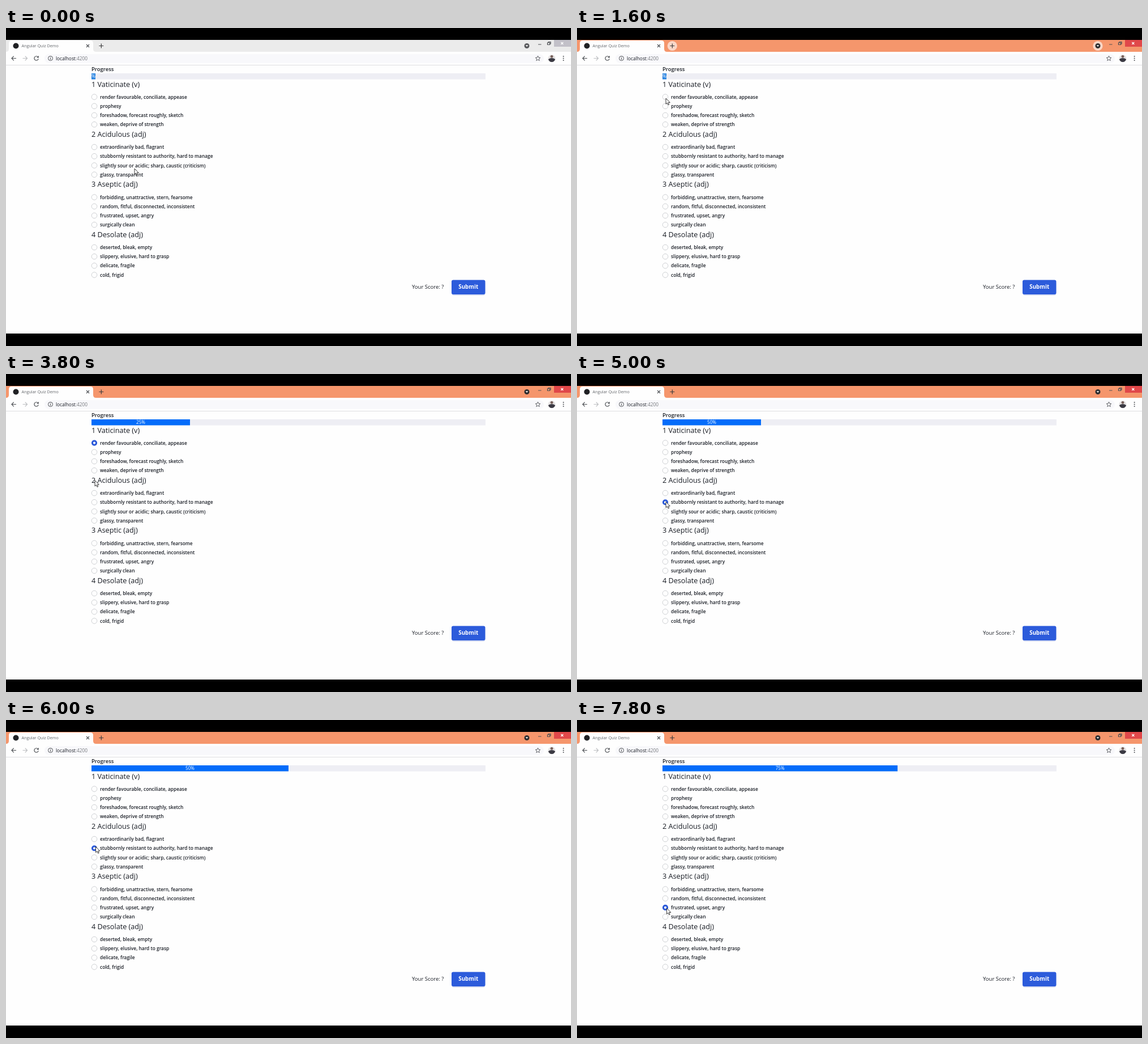
An HTML page for the animation above (8 s loop, 998 by 561 pixels).

```html
<!DOCTYPE html>
<html lang="en">
<head>
<meta charset="utf-8">
<title>Quiz</title>
<style>
  html, body { margin: 0; width: 100%; height: 100%; overflow: hidden; background: #000; }
  svg { display: block; width: 998px; height: 561px; font-family: "Open Sans", "Noto Sans", sans-serif; fill: #181c24; }
  .line { fill: none; stroke: #4d5054; stroke-width: 1.2; }
  .head { font-size: 12.65px; font-weight: 500; }
  .opt { font-size: 8.35px; font-weight: 600; }
  .radio circle { fill: #fff; stroke: #c2c4c8; stroke-width: .8; }
  .radio.on circle { stroke: #2b59d9; stroke-width: 3; r: 3.6px; }
  #bar { fill: #58595c; }
  .title { fill: #ebebeb; }
  .close { fill: #c2c0c8; }
  .active { fill: #2e2e30 !important; }
  .active .title { fill: #f5966c; }
  .active .close { fill: #e0484a; }
  .hover { fill: #fff; opacity: 0; }
  .flash .hover { opacity: .62; }
</style>
</head>
<body>
<svg id="stage" viewBox="0 0 998 561">
  <rect width="998" height="561" fill="#000"/>
  <rect y="21" width="998" height="518" fill="#fefefe"/>

  <g id="bar">
    <rect class="title" y="21" width="998" height="21"/>
    <path d="M0 42Q5 42 5 37V27Q5 22 10 22H149Q154 22 154 27V37Q154 42 159 42Z" fill="#fefefe"/>
    <circle cx="17.5" cy="31.5" r="5" fill="#202124"/>
    <text x="27.5" y="34.2" font-size="7.2" fill="#63666a">Angular Quiz Demo</text>
    <path class="line" d="M142 29l5 5m0-5l-5 5"/>
    <circle class="hover" cx="168.3" cy="31.5" r="8.6"/>
    <path class="line" d="M164.3 31.5h8m-4-4v8" style="stroke:#3b3b3d"/>
    <circle class="hover" cx="920" cy="31.5" r="8.6"/>
    <circle cx="920" cy="31.5" r="4.5"/>
    <path d="M917.7 30.3h4.6l-2.3 2.7z" fill="#fff"/>
    <path class="line" d="M940 29h5.5M956.5 26h4v3.5h-4zM958 26v-1.5h4v3.5h-1.5"/>
    <rect class="close" x="968" y="21" width="30" height="12"/>
    <path class="line" d="M980.3 25l4 4m0-4l-4 4" style="stroke:#fff"/>
  </g>

  <rect x="68" y="46" width="882" height="15.5" rx="7.75" fill="#f8f8fb"/>
  <path class="line" d="M18 53.5H10m3.7-3.8L10 53.5l3.7 3.8"/>
  <path class="line" d="M29.5 53.5h8m-3.7-3.8l3.7 3.8-3.7 3.8" style="stroke:#bcbec1"/>
  <path class="line" d="M56.6 51.3A3.7 3.7 0 1 0 57.2 54.3M57.2 49.3v2.7h-2.7"/>
  <circle class="line" cx="78.5" cy="53.5" r="4" style="stroke-width:1"/>
  <path class="line" d="M78.5 53v2.8m0-4.8v1"/>
  <text x="88" y="56.6" font-size="8.3">localhost<tspan fill="#75787d">:4200</tspan></text>
  <path class="line" d="M939.5 49.2l1.3 2.9 3 .3-2.3 2 .7 3.1-2.7-1.7-2.7 1.7.7-3.1-2.3-2 3-.3z" style="stroke-width:.9"/>
  <circle cx="964" cy="53.5" r="6.4" fill="#e6e3e3"/>
  <circle cx="964" cy="50.3" r="2.4" fill="#77615b"/>
  <path d="M957.8 55.2Q964 50.8 970.2 55.2Q968.5 59.9 964 59.9T957.8 55.2Z" fill="#3b3a43"/>
  <g fill="#4d5054"><circle cx="984.6" cy="50" r="1"/><circle cx="984.6" cy="53.5" r="1"/><circle cx="984.6" cy="57" r="1"/></g>
  <path d="M0 65.5H998" stroke="#dedee1"/>

  <text x="151" y="76" font-size="9.5" font-weight="600">Progress</text>
  <rect x="151" y="80" width="696" height="10.5" fill="#eeeef4"/>
  <rect id="fill" x="151" y="80" height="10.5" fill="#046cfa"/>
  <rect id="mark" x="151" y="80" width="7" height="10.5" fill="#2380e0"/>
  <text id="label" y="88.2" font-size="8.1" fill="#fff" text-anchor="middle"></text>

  <g id="quiz"></g>

  <text x="717" y="459.6" font-size="9.5">Your Score: ?</text>
  <rect x="787.5" y="447" width="59" height="25" rx="4" fill="#ccd5ee" opacity=".75"/>
  <rect x="787" y="444.5" width="59.5" height="25.5" rx="3" fill="#2c5bdb"/>
  <text x="816.7" y="460.3" font-size="9.8" font-weight="700" fill="#fff" text-anchor="middle">Submit</text>

  <path id="cursor" d="M0 0V10.2L2.4 8.1L4 11.7L5.7 11L4.2 7.5H7.3Z" fill="#fff" stroke="#222" stroke-width=".9"/>
</svg>
<script>
const LOOP = 8000, STEP = 200, GROW = 600, FULL = 696;
const questions = [
  ["Vaticinate (v)", "render favourable, conciliate, appease", "prophesy",
    "foreshadow, forecast roughly, sketch", "weaken, deprive of strength"],
  ["Acidulous (adj)", "extraordinarily bad, flagrant", "stubbornly resistant to authority, hard to manage",
    "slightly sour or acidic; sharp, caustic (criticism)", "glassy, transparent"],
  ["Aseptic (adj)", "forbidding, unattractive, stern, fearsome", "random, fitful, disconnected, inconsistent",
    "frustrated, upset, angry", "surgically clean"],
  ["Desolate (adj)", "deserted, bleak, empty", "slippery, elusive, hard to grasp",
    "delicate, fragile", "cold, frigid"]
];
// time of each click and the option row it selects
const clicks = [[1620, 0], [5000, 5], [7656, 10]];
// time, x, y of the pointer tip
const path = [
  [0, 227, 248], [200, 225, 246], [1400, 158.5, 124], [1600, 157, 124], [2400, 157, 124.5],
  [2800, 157, 126], [3600, 157, 176], [4200, 157, 221], [4600, 157, 224], [5000, 157, 225.5],
  [5600, 158.5, 223.5], [6000, 158.5, 223.5], [6800, 158.5, 320], [7200, 158.5, 332], [8000, 158.5, 332]
];

const $ = id => document.getElementById(id);

$("quiz").innerHTML = questions.map(([word, ...options], q) => {
  const top = 99 + q * 88.45;
  const rows = options.map((text, i) => {
    const y = top + 22.6 + i * 16.2;
    return `<g class="radio"><circle cx="156" cy="${y}" r="4.8"/></g>` +
      `<text class="opt" x="166" y="${y + 3.1}">${text}</text>`;
  });
  return `<text class="head" x="151" y="${top + 4.5}">${q + 1} ${word}</text>` + rows.join("");
}).join("");
const radios = document.querySelectorAll(".radio");

// cubic-bezier(.25, .1, .25, 1)
function ease(x) {
  if (x <= 0 || x >= 1) return x <= 0 ? 0 : 1;
  const curve = (s, a, b) => 3 * s * (1 - s) ** 2 * a + 3 * s * s * (1 - s) * b + s ** 3;
  let lo = 0, hi = 1;
  for (let i = 0; i < 20; i++) {
    const mid = (lo + hi) / 2;
    if (curve(mid, .25, .25) < x) lo = mid; else hi = mid;
  }
  return curve(lo, .1, 1);
}

function pointer(t) {
  const i = path.findIndex(p => p[0] > t);
  const [t0, x0, y0] = path[i - 1], [t1, x1, y1] = path[i];
  const k = (t - t0) / (t1 - t0), s = k * k * (3 - 2 * k);
  return [x0 + (x1 - x0) * s, y0 + (y1 - y0) * s];
}

function draw(t) {
  const done = clicks.filter(c => c[0] <= t);
  const count = done.length;
  const picked = count ? done[count - 1][1] : -1;
  const width = done.reduce((sum, c) => sum + ease((t - c[0]) / GROW), 0) * FULL / 4;

  $("bar").setAttribute("class", (t >= 1600 ? "active" : "") + (t === 1600 ? " flash" : ""));
  $("fill").setAttribute("width", width);
  $("mark").style.display = count ? "none" : "";
  $("label").setAttribute("x", count ? 151 + width / 2 : 154.5);
  $("label").textContent = count ? count * 25 + "%" : "%";
  radios.forEach((r, i) => r.classList.toggle("on", i === picked));
  $("cursor").setAttribute("transform", `translate(${pointer(t)})`);
}

const start = performance.now();
function tick() {
  const t = (performance.now() - start) % LOOP;
  draw(Math.floor(t / STEP) * STEP);
  requestAnimationFrame(tick);
}
tick();
</script>
</body>
</html>
```
